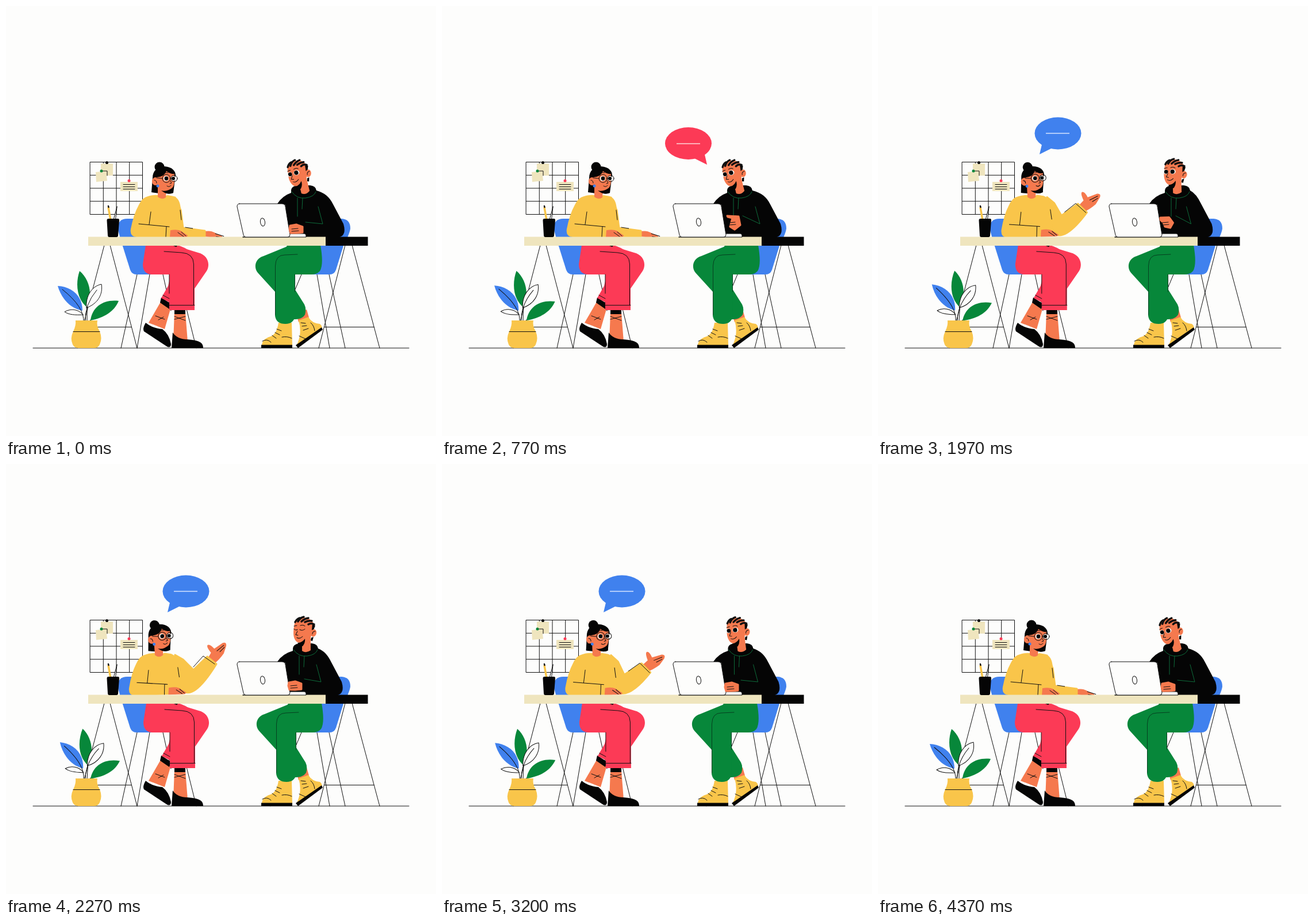
These frames come from a looping animation (748x748 px, 4410 ms). An HTML page:

```html
<!DOCTYPE html>
<html lang="en">
<head>
<meta charset="utf-8">
<title>Desk talk</title>
<style>
  html, body { margin: 0; width: 100%; height: 100%; overflow: hidden; background: #fdfdfc; }
  svg { display: block; width: 100vw; height: 100vh; }
  .ln { fill: none; stroke: #111; stroke-width: 1; stroke-linecap: round; stroke-linejoin: round; }
  .k { fill: #050505; }
  .skin { fill: #f5794e; }
  .gold { fill: #f9c54a; }
  .red { fill: #fc3a56; }
  .blue { fill: #4081ee; }
  .green { fill: #07873a; }
  .sand { fill: #efe5be; }
  .paper { fill: #fdfdfc; }
  .seam { fill: none; stroke: #0d6b3a; stroke-width: 1; stroke-linecap: round; stroke-linejoin: round; }
  .join { stroke-width: 3; stroke-linejoin: round; }
</style>
</head>
<body>
<svg viewBox="0 0 748 748">
  <!-- wall grid and notes -->
  <path class="ln" d="M146.500 271.500h91v91h-91zM169.300 271.500v91M192 271.500v91M214.700 271.500v91M146.500 294.300h91M146.500 317h91M146.500 339.700h91"/>
  <path class="sand" d="M165 274h21v21h-21zM156 289l18-2 2 17-19 2zM199 306h30v16h-30z"/>
  <path class="ln" d="M166 287h10v8M204 310.500h20M204 314.500h20M204 318.500h20"/>
  <circle class="k" cx="175.500" cy="272.500" r="2.500"/>
  <circle class="green" cx="166" cy="287" r="2.500"/>
  <circle class="red" cx="214" cy="304" r="2.500"/>

  <!-- floor, trestles, chairs -->
  <path class="ln" d="M47 595H701M171 416L124 595M181 416L228 595M134 558.500H218M590 416L544 595M602 416L650 595M554 558.500H640"/>
  <path class="ln" d="M228 467L200 595M250 467L228 595M273 467L287 530M299 467L331 595M514 467L460 595M541 467L563 595M562 467L590 595"/>
  <path class="blue" d="M194 386Q195 370 211 370H245L290 467H227Q219 467 216 459L199 405Z"/>
  <path class="blue" d="M555 370H584Q599 371 599 387Q598 396 587 417L574 459Q571 467 563 467H505L500 416Z"/>

  <!-- woman, legs -->
  <path class="skin" d="M270 513L287 524 276 562 248 551ZM293 533H312L316 584H291Z"/>
  <path class="k" d="M270 507L287 518 284 527 268 516ZM293 528H312V536H293Z"/>
  <path class="k" d="M243 551Q255 561 272 562Q284 571 287 588Q287 595 281 593L240 566Q237 561 243 551Z"/>
  <path class="k" d="M290 568Q298 580 316 580Q332 581 338 585Q343 588 343 595H288Z"/>
  <path class="ln" d="M260 539l16 6M265 546l9-5M293 545l19-5M293 540l19 7"/>
  <g id="wLegs">
    <path class="red" d="M298 418L334 429C351 433 356 449 349 461L327 493 291 519 270 508 282 487Z"/>
    <path class="red" d="M243 416H298Q328 424 328 447V529H284V467H253Q238 466 238 449Z"/>
    <path class="ln" d="M275 427L305 429Q326 430 326.500 449V520M284 520.500H328M273 503L284 509M284 467V500"/>
    <path class="k" d="M286 415H300L296 419Z"/>
  </g>

  <!-- woman, far arm -->
  <path id="wHand" class="skin"/>
  <path id="wFingers" class="ln" d="M18 -3L33 0M20 2L31 3"/>
  <path id="wSleeve" class="gold join" stroke="#f9c54a"/>
  <path id="wCuff" class="ln"/>

  <!-- woman, body -->
  <g id="wBody">
    <path class="gold" d="M247 331Q255 328 265 329Q272 333 281 329L292 331Q303 335 304 354L306 386 298 402H227Q215 401 217 388Q222 362 231 346Q237 333 247 331Z"/>
    <path class="ln" d="M252 358L249 380M231 379L284 384M279 384L278 402M303 355L305 372"/>
    <path class="skin" d="M286 390Q297 388 304 391L316 399Q316 402 311 402H285Z"/>
    <path class="ln" d="M299 394L309 401M305 393L313 400"/>
  </g>
  <g id="wHead">
    <path class="k" d="M255 299C255 286 264 279 276 279C290 280 295 288 295 294L291 325Q281 329 272 322L267 326 253 324Z"/>
    <circle class="k" cx="267" cy="280" r="8.500"/>
    <path class="skin" d="M264 313L262 298Q276 297 279 287Q286 293 293 292V306Q291 321 279 322L278 333Q271 338 264 332Z"/>
    <path class="k" d="M270 321Q280 324 291 315V325Q281 329 273 323Z"/>
    <ellipse class="skin" cx="260" cy="305" rx="6" ry="7"/>
    <path class="ln" d="M258 303q4 0 4 5"/>
    <circle class="blue" cx="264" cy="313" r="2.500"/>
    <circle class="paper" cx="278.500" cy="300" r="4.500"/><circle class="paper" cx="291" cy="300" r="4"/>
    <circle class="k" cx="279" cy="300" r="3.400"/><circle class="k" cx="291" cy="300" r="3"/>
    <circle class="ln" cx="279" cy="300" r="7"/><circle class="ln" cx="292.500" cy="300" r="5.500"/>
    <path class="ln" d="M262 299L272 300M286 300h1M280 313q4 3 7-1M286 304l2 4-3 1M274 291q4-3 8-1"/>
  </g>

  <!-- man, legs and boots -->
  <path class="skin" d="M505 536L523 528 527 542 509 550Z"/>
  <path class="gold" d="M474 551H497L498 590H445Q446 579 460 575Q471 571 474 551ZM509 547L526 541Q532 552 546 553Q551 557 549 562L505 591Q516 570 509 547Z"/>
  <path class="k" d="M444 589.500H498V595H444ZM504 590L549 559 551 563 508 595Z"/>
  <path class="ln" d="M471 562l8 3M468 568l8 4M463 573l7 5M480 576q9-2 17 2M446 583q8-5 15 2M513 551l8 1M515 557l8-1M517 564l9-3M530 551q6 5 7 14M510 574l11 5"/>
  <g id="mLegs">
    <path class="green" d="M492 417L448 435C432 440 431 456 438 464L468 497 492 544Q513 548 520 537Q523 527 519 519L502 492Z"/>
    <path class="green" d="M489 416H547Q553 450 546 461Q541 467 531 467H502L503 538Q501 553 486 553Q470 553 468 539V450Q469 431 484 430Z"/>
    <path class="seam" style="stroke:#063f20" d="M468.500 537V452Q469 433 485 433L507 432M502.500 467V497"/>
  </g>

  <!-- man, body -->
  <path id="mBody" class="k"/>
  <path id="mSeam" class="seam"/>
  <g id="mHead">
    <path class="skin" d="M502 277C500 289 499 297 502 304C505 311 511 312 515 310V325Q522 330 530 324V302L536 280Q532 268 518 267Q506 268 502 277Z"/>
    <path class="k" d="M507 311Q515 311 520 304Q521 311 516 317Q510 316 507 311ZM531 302L535 301 533 308 530 307Z"/>
    <path class="k" d="M533 278L538 281 535 289 532 289Z"/>
    <path class="ln" style="stroke-width:3.400" d="M503 275Q506 269 511 268M508 274Q512 267 518 266M514 274Q519 269 526 268M520 275Q526 272 532 273M526 279Q531 276 536 279"/>
    <ellipse class="skin" cx="535" cy="294" rx="5" ry="6.500" transform="rotate(18 535 294)"/>
    <path class="ln" d="M533 296q0-5 5-5M507 291l-3 6 4 1M506 302q5 3 10-2M501 282l5-1M512 281q5-2 8 1"/>
    <g id="open">
      <ellipse class="paper" cx="503.500" cy="288" rx="3.800" ry="4"/><ellipse class="paper" cx="515.500" cy="288" rx="5" ry="4.300"/>
      <circle class="k" cx="504" cy="288" r="3.400"/><circle class="k" cx="515" cy="288" r="3.700"/>
    </g>
    <path id="shut" class="ln" d="M501 287q3 3 6 1M511 288q5 3 9-1"/>
  </g>

  <!-- table top -->
  <path class="sand" d="M143 401.500H556V417H143Z"/>
  <path class="k" d="M556 401.500H629.500V417H556Z"/>
  <path class="ln" style="fill:#fdfdfc" d="M490 396H519Q522 396 522 402H412Z"/>
  <path class="ln" style="fill:#fdfdfc" d="M406 344H480Q485 344 486 349L494 398Q494 402 490 402H417Q414 402 413 398L402 349Q402 344 406 344Z"/>
  <ellipse class="ln" cx="446.500" cy="376" rx="4" ry="7" transform="rotate(-8 446 376)"/>
  <g id="mHand">
    <path id="mFist" class="skin join" stroke="#f5794e"/>
    <path class="ln" d="M-8 0L3 -1M-8 4L4 3"/>
  </g>

  <!-- pencil cup -->
  <path d="M178 350L182 373" stroke="#f9c54a" stroke-width="3.500"/>
  <path class="ln" style="stroke-width:2.500" d="M178 348l.5 2"/>
  <path class="ln" style="fill:#fdfdfc" d="M193 349L187 372 190 373Z"/>
  <path class="k" d="M178 370H195Q197 370 197 373L195 399Q195 402 192 402H180Q177 402 177 399L175.500 373Q175.500 370 178 370Z"/>

  <!-- plant -->
  <g id="plant">
    <path class="blue" d="M133 530C111 526 96 508 90 487C112 488 133 502 133 530Z"/>
    <path class="green" d="M141 524C122 509 121 481 128 461C144 474 152 500 141 524ZM147 547C150 523 170 510 196 513C188 532 171 542 147 547Z"/>
    <path class="ln" style="fill:#fdfdfc" d="M140 525C138 504 150 487 166 484C169 501 160 518 140 525ZM134 537C120 538 109 537 102 532C112 526 126 527 134 537Z"/>
    <path class="ln" d="M135 550Q137 524 98 493M138 550Q136 520 158 494M143 550L147 546M141 550V523"/>
  </g>
  <path class="gold" d="M121 547H159Q157 556 163 566Q168 578 163 589Q160 595 153 595H127Q119 595 116 589Q111 578 117 566Q122 556 121 547Z"/>
  <path class="ln" d="M117 566.500H163"/>

  <!-- speech -->
  <g id="say1">
    <path class="red" d="M437 264L461 276 456 254Z"/><ellipse class="red" cx="428.500" cy="239" rx="40.500" ry="28"/>
    <path d="M408 239.500H449" stroke="#ffd9dc" stroke-width="1.300"/>
  </g>
  <g id="say2">
    <path class="blue" d="M286 237L281 258 303 247Z"/><ellipse class="blue" cx="313" cy="221.500" rx="40.500" ry="28"/>
    <path d="M292 221.500H333" stroke="#d9e6ff" stroke-width="1.300"/>
  </g>
</svg>
<script>
const LOOP = 4410;
const el = id => document.getElementById(id);
const set = (id, attrs) => { for (const k in attrs) el(id).setAttribute(k, attrs[k]); };
const clamp = x => Math.min(1, Math.max(0, x));
const smooth = x => x * x * (3 - 2 * x);
const lerp = (a, b, t) => a + (b - a) * t;

// Rows are [time, ...values]; eased between neighbours.
function pose(rows, t) {
  let i = 0;
  while (i < rows.length - 2 && t >= rows[i + 1][0]) i++;
  const a = rows[i], b = rows[i + 1];
  const u = smooth(clamp((t - a[0]) / (b[0] - a[0])));
  return a.slice(1).map((v, k) => lerp(v, b[k + 1], u));
}

// Blends two paths that share the same commands.
function mix(a, b, t) {
  const to = b.match(/-?[\d.]+/g);
  let i = 0;
  return a.replace(/-?[\d.]+/g, n => lerp(+n, +to[i++], t).toFixed(2));
}

// time, head angle, head x, hood x, elbow x, hand x, hand y, pointing, knee x
const MAN = [
  [0, -14, -3, -3, 589, 505, 388, 0, 0],
  [100, -14, -3, -3, 589, 505, 388, 0, 0],
  [520, -14, -5, -3, 591, 507, 377, 1, 3],
  [1080, -14, -5, -3, 591, 507, 377, 1, 3],
  [1440, -3, -4, 0, 579, 501, 368, 1, 2],
  [1640, -3, -4, 0, 579, 501, 368, 1, 2],
  [2300, 0, 0, 0, 586, 503, 386, 0, 2],
  [2950, 0, 0, 0, 586, 503, 388, 0, 2],
  [3450, -14, -3, -3, 589, 505, 388, 0, 0],
  [LOOP, -14, -3, -3, 589, 505, 388, 0, 0]
];

// time, head angle, head x, body angle, body x, arm lift (0 table, 1 half, 2 high)
const WOMAN = [
  [0, 0, 0, 0, 0, 0],
  [500, 0, 1, 0, 0, 0],
  [1000, 0, 1, 0, 0, 0],
  [1400, 0, 0, 0, 0, 0],
  [1620, 0, 0, 0, 0, 0],
  [2120, -4, -5, -2, -2.5, 2],
  [2930, -4, -5, -2, -2.5, 2],
  [3430, 0, 0, 0, -2, 1],
  [3740, 0, 0, 0, -2, 1],
  [4200, 0, 0, 0, 0, 0],
  [LOOP, 0, 0, 0, 0, 0]
];

const ARM = [
  { sleeve: "M294 333L304 355L308 386L346 391L346 401Q320 402 306 401L288 401Z", cuff: "M312 385L325 387L325 387", x: 346, y: 397, r: 6 },
  { sleeve: "M294 333L305 347L310 373L345 356L360 374Q325 406 304 400L288 400Z", cuff: "M323 366L345 356L360 375", x: 353, y: 364, r: -19 },
  { sleeve: "M294 332L308 340L326 358L350 335L366 348Q324 416 304 391L290 390Z", cuff: "M326 353L343 334L363 348", x: 358, y: 341, r: -51 }
];
const FLAT = "M-3 -5L5 -6Q10 -7 15 -5Q18 -4 20 -3L28 -1Q33 1 28 3L22 4Q8 4 -3 4Z";
const OPEN = "M-3 -7L9 -9Q12 -23 16 -22Q20 -20 18 -9L35 -4Q41 0 35 4L22 9Q8 10 -3 7Z";
const FIST = "M-11 -6L-12 0L-10 7L0 7L11 6L11 -4L0 -8Z";
const POINT = "M-11 -12L-10 -10L-2 -8L-6 7L2 12L12 4L9 -11Z";

function drawMan(t) {
  const [angle, x, h, e, hx, hy, p, knee] = pose(MAN, t);
  set("mHead", { transform: `translate(${x}) rotate(${angle} 520 318)` });
  set("mBody", { d: `M${499 + h} 323Q${498 + h} 312 ${514 + h} 312H${532 + h}Q${542 + h} 313 ${543 + h} 321Q${e - 29} 326 ${e - 20} 345L${e - 2} 379Q${e + 5} 403 ${e - 16} 403H490L486 346 472 344Q481 330 ${499 + h} 325Z` });
  set("mSeam", { d: `M${519 + h} 334L${518 + h} 353M${510 + h} 334V366M${500 + h} 323Q${509 + h} 336 ${524 + h} 334T${542 + h} 323M${e - 46} 349L${e - 38} 379 ${hx + 16} ${hy - 12}` });
  set("mHand", { transform: `translate(${hx} ${hy})` });
  set("mFist", { d: mix(FIST, POINT, p) });
  set("mLegs", { transform: `translate(${knee})` });
  const blink = t > 2190 && t < 2340;
  set("open", { opacity: blink ? 0 : 1 });
  set("shut", { opacity: blink ? 1 : 0 });
}

function drawWoman(t) {
  const [angle, x, lean, bx, lift] = pose(WOMAN, t);
  set("wHead", { transform: `translate(${x}) rotate(${angle} 271 332)` });
  set("wBody", { transform: `translate(${bx}) rotate(${lean} 265 402)` });
  set("wLegs", { transform: `translate(${-bx / 2.5})` });
  const i = lift < 1 ? 0 : 1, u = lift - i, a = ARM[i], b = ARM[i + 1];
  const at = k => lerp(a[k], b[k], u);
  const wrist = `translate(${at("x")} ${at("y")}) rotate(${at("r")})`;
  set("wSleeve", { d: mix(a.sleeve, b.sleeve, u) });
  set("wCuff", { d: mix(a.cuff, b.cuff, u) });
  set("wHand", { d: mix(FLAT, OPEN, clamp(lift)), transform: wrist });
  set("wFingers", { transform: wrist });
}

// Slides in from below, leaves upward while fading.
function bubble(id, t, start, end) {
  const a = clamp((t - start) / 270), b = clamp((t - end) / 130);
  const rise = 1 - (1 - a) ** 3;
  set(id, { opacity: a * (1 - b), transform: `translate(0 ${28 * (1 - rise) - 56 * smooth(b)})` });
}

function draw(t) {
  drawMan(t);
  drawWoman(t);
  bubble("say1", t, 200, 1475);
  bubble("say2", t, 1700, 3580);
  const sway = 1.75 * (1 - Math.cos(2 * Math.PI * t / LOOP));
  set("plant", { transform: `rotate(${sway} 140 548)` });
}

const begin = performance.now();
function tick() {
  draw((performance.now() - begin) % LOOP);
  requestAnimationFrame(tick);
}
tick();
</script>
</body>
</html>
```
